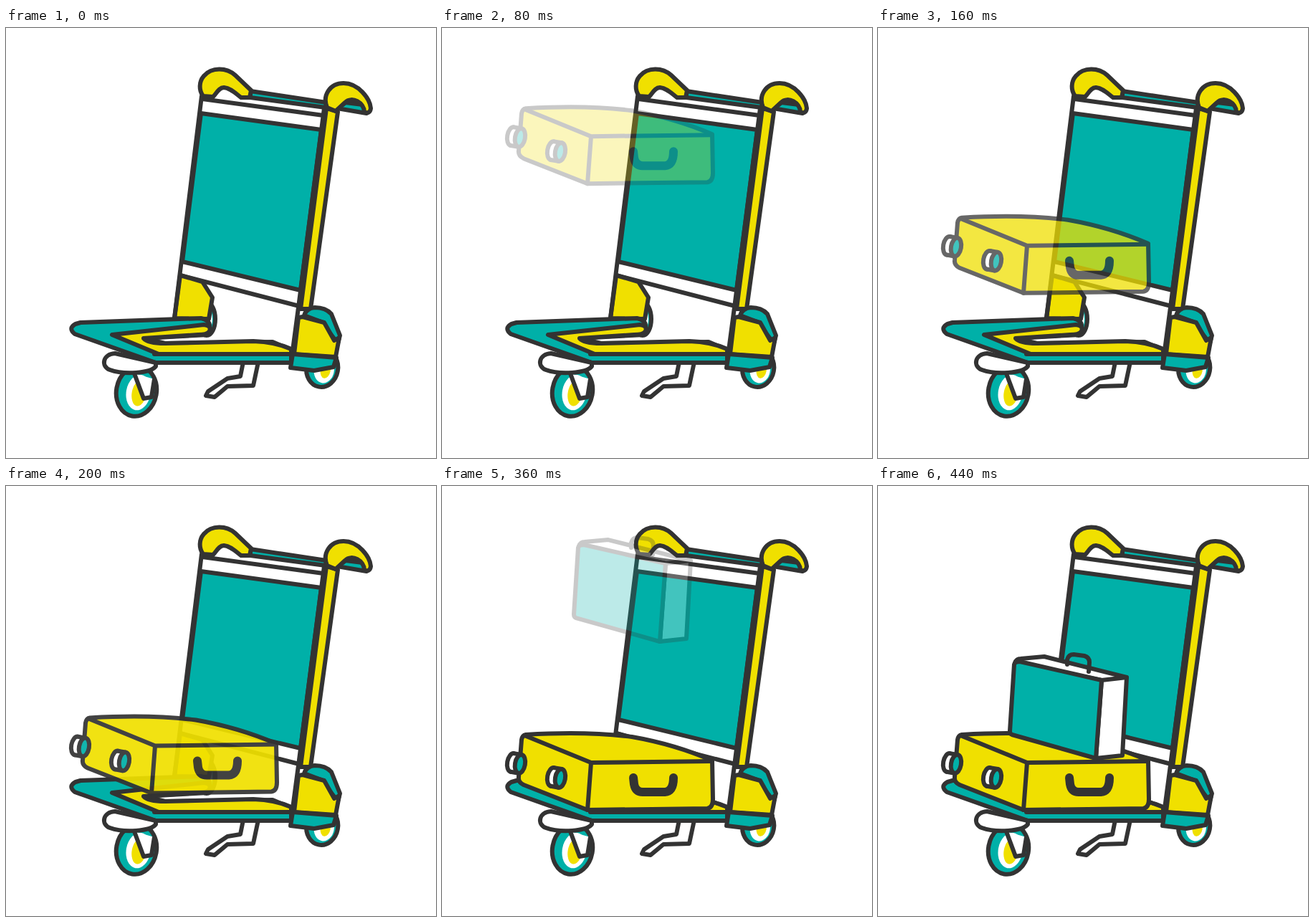
Write an HTML page that moves like this. It is 600 by 600 pixels and loops after 1680 ms.

```html
<!DOCTYPE html>
<html lang="en">
<head>
<meta charset="utf-8">
<title>Luggage cart</title>
<style>
  html, body { margin: 0; width: 100%; height: 100%; overflow: hidden; background: #fff; }
  svg { display: block; width: 100%; height: 100%; }
  .ink { stroke: #333; stroke-width: 6; stroke-linejoin: round; stroke-linecap: round; fill: none; }
  .t { fill: #00b0a8; }
  .y { fill: #f0e000; }
  .w { fill: #fff; }
  .flat { stroke: none; }
</style>
</head>
<body>
<svg viewBox="0 0 600 600">
  <g class="ink">
    <!-- rear wheels -->
    <ellipse class="t" cx="280" cy="406" rx="12" ry="23"/>
    <ellipse class="w flat" cx="281" cy="406" rx="7" ry="16"/>
    <g transform="rotate(10 441 476)">
      <ellipse class="t" cx="441" cy="475" rx="22" ry="26"/>
      <ellipse class="w flat" cx="444" cy="477" rx="14" ry="18"/>
      <ellipse class="y flat" cx="446" cy="477" rx="7" ry="11"/>
    </g>

    <!-- foot brake -->
    <path class="w" d="M331 466 327 486 309 489 282 507 279 513 291 515 309 500 345 499 352 466"/>

    <!-- back panel -->
    <path class="w flat" d="M273 98 443 122 409 388 243 345Z"/>
    <path class="t" d="M341 88 447 104 446 111 341 97Z"/>
    <path class="t" d="M272 119 440 142 411 366 246 326Z"/>
    <path d="M274 99 443 122M243 345 409 388"/>
    <path class="y" d="M243 345 274 354 288 376 283 406 235 405Z"/>
    <path d="M273 95 235 405"/>
    <path class="y" d="M447 112 463 117 425 392 411 392Z"/>
    <path d="M444 112 408 390 400 450"/>

    <!-- platform -->
    <path class="t" d="M104 411 272 405Q285 408 284 417L282 428 192 433 222 440 372 438 398 449 398 467 209 467 96 427Q86 419 97 413Z"/>
    <path class="y" d="M148 428 276 414Q287 415 284 423 281 428 268 428L192 433Q198 440 222 440L345 437Q376 438 398 448L398 455 213 455Z"/>
    <path d="M207 455H398"/>

    <!-- rear bracket -->
    <path class="t" d="M416 401Q419 391 431 390 446 390 454 399L466 429 463 440 440 410Z"/>
    <path class="y" d="M414 403 444 411 458 436 465 432 460 459 402 455 408 404Z"/>
    <path class="t" d="M400 455 461 460 457 473 430 478 397 474Z"/>

    <!-- front wheel -->
    <g transform="rotate(10 182 507)">
      <ellipse class="t" cx="182" cy="507" rx="28" ry="35"/>
      <ellipse class="w flat" cx="185" cy="508" rx="17" ry="25"/>
      <ellipse class="y flat" cx="186" cy="509" rx="10" ry="18"/>
    </g>
    <path class="w" d="M179 482 192 517 203 515 207 490"/>
    <path class="w" d="M152 454C135 455 132 472 145 477 164 484 202 482 209 472V467Z"/>

    <!-- grips -->
    <path class="y" d="M275 95C269 87 269 75 276 67 287 54 308 55 320 66L342 87 340 97 328 97C321 92 314 84 304 83 297 83 294 91 289 96Z"/>
    <path class="t" d="M462 112 503 119 498 107 474 104Z"/>
    <path class="y" d="M448 111C441 94 452 77 471 77 492 77 508 99 509 112 508 119 504 119 500 117 500 105 483 94 473 104L460 116Z"/>
  </g>

  <g class="ink" id="suitcase">
    <path class="y" d="M117 347C150 345 210 343 265 350 305 357 340 367 377 383L378 437Q378 449 370 450L203 452 114 417Q106 413 107 406L111 354Q112 348 117 347Z"/>
    <path d="M115 348 208 386 377 384M208 386 203 452"/>
    <g id="wheel" transform="rotate(10 104 387)">
      <ellipse class="w" cx="98" cy="387" rx="7" ry="13"/>
      <path class="w flat" d="M98 376H109V398H98Z"/>
      <path d="M98 374H109M98 400H109"/>
      <ellipse class="t" cx="109" cy="387" rx="7" ry="13"/>
    </g>
    <g transform="translate(56 20)"><use href="#wheel"/></g>
    <path d="M267 407 268 416Q270 427 280 427H311Q323 426 323 407" stroke-width="12"/>
  </g>

  <g class="ink" id="case">
    <path class="w" d="M191 247Q193 241 199 241L232 238 347 267 341 376 304 380 312 271Z"/>
    <path class="t" d="M190 249Q191 245 198 245L312 271 304 380 187 347Q184 346 184 342Z"/>
    <path d="M312 271 347 267"/>
    <path d="M264 249V242Q266 235 273 235L288 237Q295 239 295 246L294 259"/>
  </g>
</svg>
<script>
  const LOOP = 1680, STEP = 40;
  const drops = [
    { id: "suitcase", start: 0, end: 240, height: 317 },
    { id: "case", start: 320, end: 440, height: 220 }
  ].map(d => ({ ...d, el: document.getElementById(d.id) }));

  const smooth = p => p * p * (3 - 2 * p);

  function draw(now) {
    const t = Math.floor(now % LOOP / STEP) * STEP;
    for (const { el, start, end, height } of drops) {
      const p = Math.min(1, Math.max(0, (t - start) / (end - start)));
      const k = smooth(p);
      el.setAttribute("transform", `translate(0 ${(k - 1) * height})`);
      el.setAttribute("opacity", k);
    }
  }

  const origin = performance.now();
  function tick() {
    draw(performance.now() - origin);
    requestAnimationFrame(tick);
  }
  tick();
</script>
</body>
</html>
```
